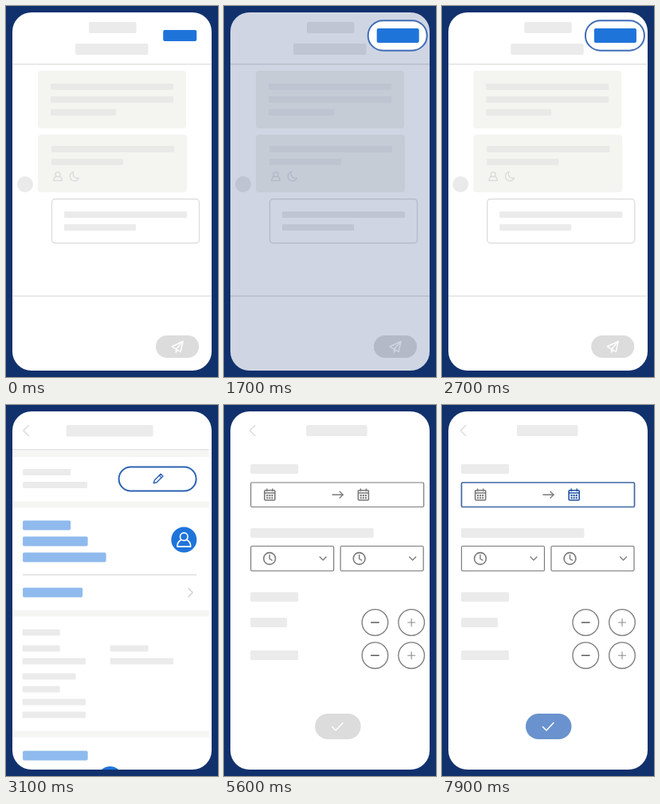
Write an HTML page with a canvas that moves like this. It is 266 px wide and 464 px high and loops after 8 s.

```html
<!DOCTYPE html>
<html lang="en">
<head>
<meta charset="utf-8">
<title>Booking flow</title>
<style>
  html, body { margin: 0; width: 100%; height: 100%; overflow: hidden; background: #11316d; }
  canvas { display: block; width: 266px; height: 464px; }
</style>
</head>
<body>
<canvas id="stage"></canvas>
<script>
const W = 266, H = 464, LOOP = 8000;
const PITCH = 275;                       // distance between neighbouring screens
const SLIDES = [2696, 5430];             // when the strip moves on
const NAVY = '#11316d', BLUE = '#1f74da', SKY = '#8fbaee', BAR = '#ebebeb',
      BAND = '#f5f5f3', RULE = '#e2e2e2', INK = '#7a7a7a', RING = '#2c62b4';
const canvas = document.getElementById('stage');
const dpr = window.devicePixelRatio || 1;
canvas.width = W * dpr;
canvas.height = H * dpr;
const c = canvas.getContext('2d');

const ramp = (t, a, b) => Math.max(0, Math.min(1, (t - a) / (b - a)));
const smooth = (t, a, b) => { const k = ramp(t, a, b); return k * k * (3 - 2 * k); };
const mix = (a, b, k) => `rgb(${a.map((v, i) => Math.round(v + (b[i] - v) * k))})`;

// Underdamped spring from 0 to 1
function spring(ms) {
  if (ms <= 0) return 0;
  const u = ms * 0.0122;
  return 1 - Math.exp(-0.75 * u) * (Math.cos(u) + 0.75 * Math.sin(u));
}

function box(x, y, w, h, r, color) {
  c.beginPath();
  c.roundRect(x, y, w, h, r);
  c.fillStyle = color;
  c.fill();
}
function frame(x, y, w, h, r, color, width) {
  c.beginPath();
  c.roundRect(x, y, w, h, r);
  c.strokeStyle = color;
  c.lineWidth = width;
  c.stroke();
}
function disc(x, y, r, color) {
  c.beginPath();
  c.arc(x, y, r, 0, 7);
  c.fillStyle = color;
  c.fill();
}
function circle(x, y, r, color, width) {
  c.beginPath();
  c.arc(x, y, r, 0, 7);
  c.strokeStyle = color;
  c.lineWidth = width;
  c.stroke();
}
function line(points, color, width, close) {
  c.beginPath();
  for (const [x, y] of points) c.lineTo(x, y);
  if (close) c.closePath();
  c.strokeStyle = color;
  c.lineWidth = width;
  c.lineCap = c.lineJoin = 'round';
  c.stroke();
}

// Placeholder text: one bar per width, evenly spaced
function lines(x, y, step, h, widths, color = BAR) {
  widths.forEach((w, i) => box(x, y + i * step, w, h, h / 7, color));
}
const rule = y => box(8, y, 250, 1.6, 0, RULE);
const band = y => box(8, y, 250, 8, 0, BAND);

// Chevron pointing along (dx, dy)
function chevron(x, y, dx, dy, size, color) {
  const a = size / 2;
  line([[x - dx * a - dy * size, y - dy * a - dx * size], [x + dx * a, y + dy * a],
        [x - dx * a + dy * size, y - dy * a + dx * size]], color, 1.3);
}
const back = x => chevron(x, 32, -1, 0, 6.5, '#dadada');

function person(x, y, s, color, width) {
  c.save();
  c.translate(x, y);
  c.scale(s, s);
  circle(0, -3.6, 4.6, color, width / s);
  c.beginPath();
  c.moveTo(-3.4, 0);
  c.bezierCurveTo(-7, 2, -8, 5, -8, 8.2);
  c.lineTo(8, 8.2);
  c.bezierCurveTo(8, 5, 7, 2, 3.4, 0);
  c.lineJoin = 'round';
  c.stroke();
  c.restore();
}
function moon(x, y, color) {
  c.beginPath();
  c.arc(x, y, 5.8, 0.3, 4.3);
  c.arc(x + 3.5, y - 3.2, 5.5, 3.6, 1.2, true);
  c.closePath();
  c.strokeStyle = color;
  c.lineWidth = 1.2;
  c.stroke();
}
function calendar(x, y, color) {
  frame(x - 6.3, y - 5.3, 13, 12.3, 1, color, 1.6);
  line([[x - 6, y - 2], [x + 6.5, y - 2]], color, 1.6);
  for (const dx of [-3.3, 3.7]) line([[x + dx, y - 7], [x + dx, y - 4.5]], color, 1.5);
  for (let i = 0; i < 6; i++)
    box(x - 4 + i % 3 * 3.1, y + 0.1 + Math.floor(i / 3) * 3.1, 2.1, 2.1, 0, color);
}
function clock(x, y) {
  circle(x, y, 7.4, INK, 1.6);
  line([[x, y - 4.5], [x, y + 0.5], [x + 3, y + 2.2]], INK, 1.4);
}
function pencil(x, y, color) {
  c.save();
  c.translate(x, y);
  c.rotate(Math.PI / 4);
  line([[-2, -7], [2, -7], [2, 4], [0, 7.5], [-2, 4]], color, 1.4, true);
  line([[-2, -4.3], [2, -4.3]], color, 1.2);
  c.restore();
}
function plane(x, y) {
  line([[x - 7, y], [x + 7, y - 6.5], [x + 4, y + 6.5], [x - 1.5, y + 3.2]], '#fff', 1.4, true);
  line([[x + 7, y - 6.5], [x - 1.5, y + 3.2], [x - 1.8, y + 7.2], [x + 0.5, y + 4.5]], '#fff', 1.3);
}

// Touch mark: appears quickly, rests, fades
function tap(t, start, x, y) {
  const k = smooth(t, start, start + 100);
  c.globalAlpha = 0.42 * k * (1 - smooth(t, start + 250, start + 550));
  disc(x, y, 18 + 7 * k, '#78aaee');
  c.globalAlpha = 1;
}

// Dims the screen around the header button and leaves a ring on it
function spotlight(t) {
  const k = smooth(t, 920, 1180), s = 1.2 - 0.2 * k;
  const w = 74 * s, h = 37.5 * s, x = 217.7, y = 36.9;
  c.globalAlpha = 0.65 * k * (1 - smooth(t, 1480, 1830));
  box(8, 8, 250, 448, 0, NAVY);
  c.globalAlpha = k;
  box(x - w / 2, y - h / 2, w, h, h / 2, '#fff');
  frame(x - w / 2, y - h / 2, w, h, h / 2, '#3f6db7', 2);
  c.globalAlpha = 1;
  const bw = 42 + 11 * k, bh = 14 + 4 * k;
  box(218.2 - bw / 2, y - bh / 2, bw, bh, 2, BLUE);
}

function chat(t) {
  lines(104, 20, 0, 14, [59.5]);
  lines(87, 47, 0, 14, [91.5]);
  rule(72);
  rule(362);
  for (const i of [0, 1]) box(40, 81 + 80 * i, 186 + i, 72, 4, '#f4f4f0');
  lines(56, 97, 16, 8, [154, 154, 82], '#e9e9e8');
  lines(57, 175, 16, 8, [154, 90], '#e9e9e8');
  person(65, 213, 0.66, '#d9d9d9', 1.2);
  moon(86, 213, '#d9d9d9');
  disc(24, 223, 10, '#eaeaea');
  frame(57.5, 241.5, 185, 55, 4, '#dedede', 1.4);
  lines(73, 257, 16, 8, [154, 90]);
  box(188, 412, 54, 28, 14, '#dcdcdc');
  plane(215, 426);
  spotlight(t);
  tap(t, 1800, 218, 37);
}

function profile(t) {
  back(28.5);
  lines(79, 25, 0, 14.5, [109]);
  rule(55);
  [57, 120.5, 256.5, 407.5].forEach(band);
  lines(24.5, 80, 16, 8, [60, 81]);
  frame(145, 77.5, 97, 30, 15, RING, 2);
  pencil(194, 92.5, RING);
  lines(24.5, 144.5, 20, 12, [60, 81.5, 104.5], SKY);
  lines(24.5, 228.5, 204, 12, [75, 81.5], SKY);
  disc(226.7, 168.5, 16, BLUE);
  person(226.7, 168.5, 1.05, '#fff', 1.6);
  box(24.5, 211.5, 218, 1.7, 0, RULE);
  chevron(235, 234.5, 1, 0, 5.3, '#d0d0d0');
  lines(24, 280.5, 20, 8, [47, 47]);
  lines(24, 316.5, 0, 8, [79.5]);
  lines(134, 300.5, 16, 8, [48, 79.5]);
  lines(24, 335.5, 16, 8, [67, 47, 79.5, 79.5]);
  disc(134, 468, 16, BLUE);
  tap(t, 4534, 194, 92.5);
}

function booking(t) {
  const grey = [122, 122, 122], focus = smooth(t, 7250, 7550), ready = ramp(t, 7500, 7900);
  back(26.5);
  lines(94, 25, 0, 14, [76.5]);
  lines(24, 74, 80, 12, [60, 154.5, 60]);
  lines(24, 266, 41, 12, [46, 60]);
  frame(24.5, 97, 217, 30.5, 1.5, mix(grey, [66, 102, 164], focus), 1.2 + 0.5 * focus);
  calendar(48, 112, INK);
  line([[127, 112.3], [140, 112.3]], INK, 1.5);
  chevron(138, 112.3, 1, 0, 4, INK);
  calendar(165.5, 112, mix(grey, [30, 82, 164], focus));
  for (const x of [24.5, 137]) {
    frame(x, 176.5, 104, 31, 1.5, INK, 1.2);
    clock(x + 23.5, 192);
    chevron(x + 90.5, 192, 0, 1, 4, INK);
  }
  for (const y of [272, 313.2]) {
    for (const x of [180.3, 226]) circle(x, y, 16.3, INK, 1.3);
    line([[175.5, y], [185, y]], '#5c5c5c', 1.6);
    line([[221.5, y], [230.5, y]], '#8c8c8c', 1.1);
    line([[226, y - 4.5], [226, y + 4.5]], '#8c8c8c', 1.1);
  }
  box(105, 386, 57.5, 32, 16, mix([220, 220, 220], [106, 146, 206], ready));
  line([[126.5, 402.5], [131, 407], [140, 397.5]], '#fff', 1.5);
  tap(t, 7300, 165.5, 112);
}

const screens = [chat, profile, booking];

function draw(t) {
  c.setTransform(dpr, 0, 0, dpr, 0, 0);
  box(0, 0, W, H, 0, NAVY);
  box(8, 8, 250, 448, 24, '#fff');
  c.save();
  c.clip();
  const place = SLIDES.reduce((sum, start) => sum + spring(t - start), 0);
  screens.forEach((paint, i) => {
    const x = PITCH * (i - place);
    if (Math.abs(x) > 262) return;
    c.save();
    c.translate(x, 0);
    paint(t);
    c.restore();
  });
  c.restore();
}

function tick(now) {
  draw(now % LOOP);
  requestAnimationFrame(tick);
}
draw(0);
requestAnimationFrame(tick);
</script>
</body>
</html>
```
